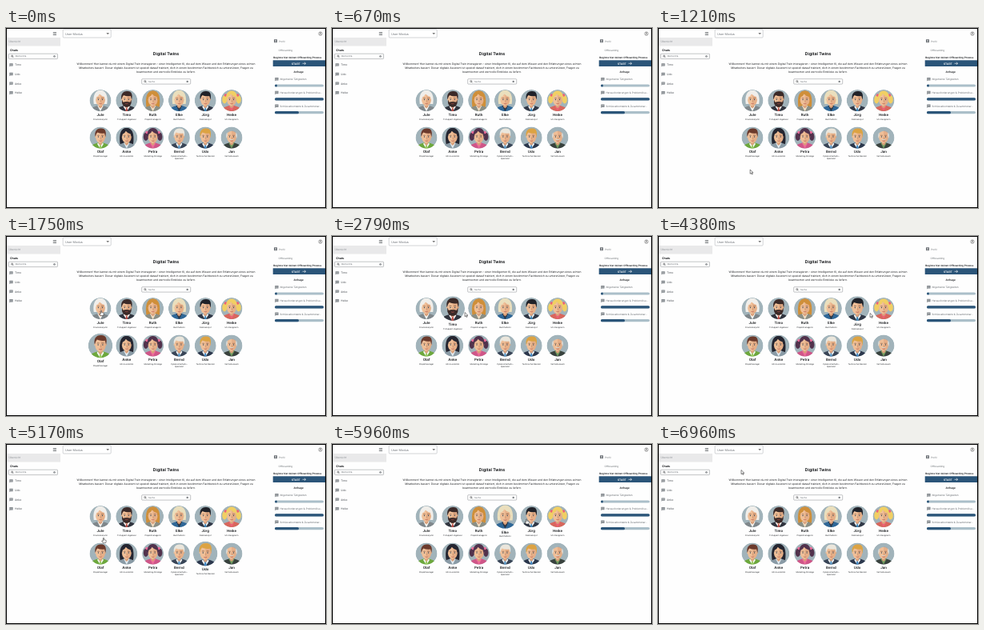
An HTML page for the animation above (7 s loop, 400 by 225 pixels).

```html
<!DOCTYPE html>
<html lang="de">
<head>
<meta charset="utf-8">
<title>Digital Twins</title>
<style>
  html, body { margin: 0; width: 100%; height: 100%; overflow: hidden; background: #fff; }
  svg { display: block; width: 100vw; height: 100vh; }
  text { font-family: Inter, Roboto, sans-serif; text-rendering: geometricPrecision; }
</style>
</head>
<body>
<svg id="stage" viewBox="0 0 400 225" preserveAspectRatio="none">
  <defs><clipPath id="disc"><circle r="13.5"/></clipPath></defs>
</svg>
<script>
const LOOP = 7000;
const NAVY = '#2b5579', INK = '#17191c', GREY = '#62676c';
const stage = document.getElementById('stage');

function add(parent, tag, attrs, content) {
  const node = document.createElementNS('http://www.w3.org/2000/svg', tag);
  for (const key in attrs) node.setAttribute(key, attrs[key]);
  if (content) node.textContent = content;
  parent.appendChild(node);
  return node;
}
const rect = (x, y, width, height, fill, more) =>
  add(stage, 'rect', { x, y, width, height, fill, ...more });
const line = (d, stroke, width = 0.5) =>
  add(stage, 'path', { d, stroke, 'stroke-width': width, fill: 'none' });
const label = (x, y, size, content, fill = GREY, weight = 400, anchor = 'start', parent = stage) =>
  add(parent, 'text', { x, y, 'font-size': size, fill, 'font-weight': weight, 'text-anchor': anchor }, content);

function searchBox(x, y, w, hint) {
  rect(x, y, w, 6.4, '#fff', { rx: 0.8, stroke: '#777c80', 'stroke-width': 0.45 });
  add(stage, 'circle', { cx: x + 4.1, cy: y + 2.9, r: 1, fill: 'none', stroke: INK, 'stroke-width': 0.5 });
  line(`M${x + 4.8} ${y + 3.6}l1.1 1.1`, INK);
  label(x + 8.3, y + 4.2, 2.7, hint);
  add(stage, 'circle', { cx: x + w - 4, cy: y + 3.2, r: 1.2, fill: '#6b7074' });
  line(`M${x + w - 4.5} ${y + 2.7}l1 1m0 -1l-1 1`, '#fff', 0.3);
}
function bubble(x, y) {
  add(stage, 'path', { d: `M${x} ${y}h4.2v3.4h-3.2l-1 1z`, fill: '#777d82' });
  line(`M${x + 0.8} ${y + 1.1}h2.6m-2.6 1.1h2.6`, '#fff', 0.35);
}

// Static page
function drawPage() {
  rect(0, 0, 400, 225, '#fefefe');
  rect(1, 12, 67, 10.5, '#e9e9ea');
  line('M58.8 5.5h4.2m-4.2 1.6h4.2m-4.2 1.6h4.2', '#3c4044', 0.6);
  label(3.5, 17.6, 3.2, 'Übersicht', '#8b9094');
  label(5, 28.6, 3.5, 'Chats', INK, 700);
  searchBox(3.5, 32.2, 61, 'Recherche');
  ['Timo', 'Udo', 'Anke', 'Heike'].forEach((name, i) => {
    const y = 46.2 + i * 11.6;
    bubble(4.4, y - 2);
    label(11, y + 1.2, 3.4, name, '#494e53');
  });

  rect(71.2, 1.8, 60, 10.2, '#fff', { rx: 1, stroke: '#a7abaf', 'stroke-width': 0.5 });
  label(74, 8.5, 3.8, 'User Modus', '#70757a');
  add(stage, 'path', { d: 'M125.4 6.2h3.6l-1.8 1.9z', fill: '#555' });

  label(200, 34, 5.2, 'Digital Twins', INK, 700, 'middle');
  [
    'Willkommen! Hier kannst du mit einem Digital Twin interagieren – einer Intelligenten KI, die auf dem Wissen und den Erfahrungen eines echten',
    'Mitarbeiters basiert. Dieser digitale Assistent ist speziell darauf trainiert, dich in einem bestimmten Fachbereich zu unterstützen, Fragen zu',
    'beantworten und wertvolle Einblicke zu liefern.'
  ].forEach((row, i) => label(200, 45.8 + i * 5.3, 3.33, row, '#1c1e21', 400, 'middle'));
  searchBox(169.7, 63.7, 61, 'Suche');

  add(stage, 'circle', { cx: 393, cy: 7, r: 2.2, fill: 'none', stroke: '#555', 'stroke-width': 0.5 });
  add(stage, 'circle', { cx: 393, cy: 6.3, r: 0.8, fill: '#555' });
  line('M391.6 8.5q1.4 -1.2 2.8 0', '#555');
  rect(335, 14.2, 4, 4, '#666b70', { rx: 0.4 });
  add(stage, 'circle', { cx: 337, cy: 15.7, r: 0.7, fill: '#fff' });
  line('M335.8 17.5q1.2 -1 2.4 0', '#fff');
  label(341, 17.5, 3, 'Profil', '#6d7276');
  label(340.6, 28.8, 3.1, 'Offboarding', '#6d7276');
  label(334.2, 38.2, 3.05, 'Beginne hier deinen Offboarding Prozess', INK, 600);
  rect(333.7, 40.3, 65.3, 7.7, NAVY);
  label(357, 45.5, 3.3, 'START', '#fff', 600);
  line('M370.6 44.3h4m-1.7 -1.6l1.7 1.6l-1.7 1.6', '#fff', 0.6);
  label(365.7, 55.7, 3.2, 'Anfrage', INK, 600, 'middle');
  [
    ['Allgemeine Tätigkeiten', 3],
    ['Herausforderungen & Problemlösu…', 61],
    ['Schlüsselkontakte & Zusammenar…', 30]
  ].forEach(([topic, done], i) => {
    const y = 64 + i * 16.8;
    bubble(336.3, y - 2);
    label(342.4, y + 1.1, 3.1, topic, '#666b70');
    rect(336, y + 6.4, 61, 3.2, '#abbfc9', { rx: 1.6 });
    rect(336, y + 6.4, done, 3.2, NAVY, { rx: 1.5 });
  });
}

// name, role lines, hair colour, clothing colour, accent colour, hair style
const people = [
  ['Jule', 'Finanzanalystin', '#f0eeea', '#7f878b', '#f5f4ef', 'bob'],
  ['Timo', 'IT-Support-Ingenieur', '#3b2a28', '#30343e', '#b94b45', 'beard'],
  ['Ruth', 'Projektmanagerin', '#cf8f3a', '#8b8f86', '#f1dfc5', 'long'],
  ['Elke', 'Buchhalterin', '#eadfbd', '#2f6797', '#2b3544', 'bob'],
  ['Jörg', 'Datenanalyst', '#202229', '#303847', '#3a83b6', 'short'],
  ['Heike', 'UX-Designerin', '#f1cf63', '#d8675c', '#ee5f76', 'tails'],
  ['Olaf', 'Projektmanager', '#6b3a2c', '#6da83d', '#9acc61', 'short'],
  ['Anke', 'HR-Assistentin', '#252631', '#8a9ba6', '#e2ebf0', 'long'],
  ['Petra', 'Marketing-Stratege', '#51324c', '#cf5688', '#ee6c9a', 'tails'],
  ['Bernd', 'Cybersicherheits-|Spezialist', '#eae6dc', '#394557', '#4d8fc0', 'short'],
  ['Udo', 'Technischer Berater', '#dca343', '#2c384d', '#3d86c3', 'short'],
  ['Jan', 'Vertriebscoach', '#d8d9d5', '#39423e', '#6e9b5e', 'bald']
];

function drawFace(disc, hair, cloth, accent, style) {
  add(disc, 'circle', { r: 13.5, fill: '#a1b3ba' });
  const g = add(disc, 'g', { transform: 'scale(1.1)' });
  const shape = (d, fill, opacity = 1) => add(g, 'path', { d, fill, opacity });
  const dot = (cx, cy, r, fill) => add(g, 'circle', { cx, cy, r, fill });
  const skin = '#efbf98';
  if (style === 'long') shape('M-7 10C-9 -1 -8 -11 0 -11S9 -1 7 10z', hair);
  if (style === 'bob') shape('M-7.5 4C-9 -5 -6 -11.5 0 -11.5S9 -5 7.5 4z', hair);
  if (style === 'tails') for (const side of [-1, 1]) {
    add(g, 'ellipse', { cx: 8 * side, cy: -1, rx: 2.7, ry: 4.6, fill: hair });
    dot(6.8 * side, -6, 1.6, accent);
  }
  shape('M-11.5 14C-11 8 -7 7.2 -3 6H3C7 7.2 11 8 11.5 14z', cloth);
  shape('M-3.4 5.8L0 12.6L3.4 5.8z', accent);
  shape('M-2 3h4v4l-2 2l-2 -2z', '#d99f7a');
  if (style === 'beard' || style === 'short') {
    shape('M-2.7 6L0 9.8L2.7 6L3.6 7.2L0 12.8L-3.6 7.2z', '#f4f4f2');
    shape('M-.8 9h1.6l.6 4h-2.8z', accent);
  }
  dot(-5.3, -1, 1, skin);
  dot(5.3, -1, 1, '#dba67f');
  shape('M-5.2 -5Q0 -10 5.2 -5V1Q4.4 5.5 0 6.5Q-4.4 5.5 -5.2 1z', skin);
  shape('M0 -8Q4 -8 5.2 -5V1Q4.4 5.5 0 6.5z', '#c97f55', 0.24);
  if (style === 'beard') shape('M-5.3 -1L-4 2Q0 .6 4 2L5.3 -1V3Q4 7.4 0 7.7Q-4 7.4 -5.3 3z', hair);
  if (style === 'bald') {
    shape('M-5.1 -6Q-7.4 -3 -5.6 1L-4.6 -3z', hair);
    shape('M5.1 -6Q7.4 -3 5.6 1L4.6 -3z', hair);
    shape('M-2.8 2.7Q0 .8 2.8 2.7z', hair);
  } else if (style === 'short' || style === 'beard') {
    shape('M-5.7 -1C-7.2 -7 -4 -11 1 -10.5C6 -10.5 7 -6 5.7 -1L4.6 -5Q0 -4.3 -3.4 -6L-4.7 -4z', hair);
  } else {
    shape('M-6 2C-7.5 -6 -5 -11 0 -11S7.5 -6 6 2L4.5 -4Q1 -5 -1 -7.5Q-2 -4.5 -4.6 -3.8z', hair);
  }
  for (const side of [-1, 1]) {
    dot(2.3 * side, -0.9, 0.6, '#34495a');
    add(g, 'path', { d: `M${2.3 * side - 1.2} -2.5h2.4`, stroke: '#674534', 'stroke-width': 0.5 });
  }
  add(g, 'path', { d: 'M0 -.8l.6 2.3h-1', fill: 'none', stroke: '#b57d5a', 'stroke-width': 0.4 });
  add(g, 'path', { d: 'M-1.5 3.5Q0 4.4 1.5 3.5', fill: 'none', stroke: '#b4534c', 'stroke-width': 0.6 });
}

function makeCard([name, role, ...look], i) {
  const x = 118 + (i % 6) * 32.8, y = i < 6 ? 90.5 : 137;
  const root = add(stage, 'g', { transform: `translate(${x} ${y})` });
  const face = add(root, 'g', { 'clip-path': 'url(#disc)' });
  drawFace(face, ...look);
  const words = add(root, 'g', {});
  label(0, 19.1, 4.4, name, INK, 600, 'middle', words);
  role.split('|').forEach((row, k) => label(0, 24 + k * 3.2, 2.45, row, '#25282b', 400, 'middle', words));
  return { x, y, face, words };
}

// Pointer track: time, x, y
const track = [
  [720, 110, 227], [880, 112, 203], [1300, 116, 172], [1500, 117, 154], [1680, 118, 130],
  [1750, 119, 95], [2250, 124, 98], [2550, 151, 98], [2790, 166, 97], [3200, 180, 98],
  [3650, 197, 97], [3710, 202, 97], [3960, 217, 97], [4250, 250, 97], [4520, 281, 99],
  [4740, 281, 140], [4960, 251, 140], [5110, 245, 136], [5170, 122, 119], [5300, 120, 138],
  [5600, 184, 138], [5720, 216, 135], [5840, 216, 95], [6080, 270, 96], [6220, 281, 97],
  [6340, 249, 96], [6600, 118, 84], [6740, 112, 60], [6830, 108, 40], [6960, 104, 34], [7000, 104, 34]
];
function pointerAt(t) {
  const next = track.findIndex(step => step[0] > t);
  if (next < 1) return null;
  const [t0, x0, y0] = track[next - 1], [t1, x1, y1] = track[next];
  const p = (t - t0) / (t1 - t0);
  return { x: x0 + (x1 - x0) * p, y: y0 + (y1 - y0) * p };
}
const over = (card, p) => p && Math.abs(p.x - card.x) < 15 && p.y > card.y - 14 && p.y < card.y + 27;

// Hover eases in and out behind the pointer
function hoverLevel(card, t) {
  let hits = 0;
  for (let k = 0; k < 8; k++) if (over(card, pointerAt(t - 60 - k * 20))) hits++;
  return hits / 8;
}

drawPage();
const cards = people.map(makeCard);
rect(0.5, 0.5, 399, 224, 'none', { stroke: '#000', 'stroke-width': 1 });
const pointerStyle = { fill: '#fff', stroke: '#222', 'stroke-width': 0.55, 'stroke-linejoin': 'round' };
const arrow = add(stage, 'path', { d: 'M0 0V5.2L1.3 4.1L2.2 6L3.1 5.5L2.2 3.8H3.9z', ...pointerStyle });
const hand = add(stage, 'path', {
  d: 'M-.6 0Q0 -.8 .6 0V2.1L2.8 2.6Q3.5 2.8 3.2 4L2.7 6H-.6L-2.4 3.6Q-1.9 2.8 -.6 3.7z', ...pointerStyle
});

function draw(t) {
  for (const card of cards) {
    const level = hoverLevel(card, t);
    card.face.setAttribute('transform', `scale(${1 + level * 0.13})`);
    card.words.setAttribute('transform', `translate(0 ${level * 2.2})`);
  }
  const p = pointerAt(t);
  const onCard = p && cards.some(card => over(card, p) || over(card, { x: p.x, y: p.y - 4 }));
  arrow.setAttribute('visibility', p && !onCard ? 'visible' : 'hidden');
  hand.setAttribute('visibility', onCard ? 'visible' : 'hidden');
  if (p) for (const shape of [arrow, hand]) shape.setAttribute('transform', `translate(${p.x} ${p.y - 1.5})`);
}
function tick() {
  draw(performance.now() % LOOP);
  requestAnimationFrame(tick);
}
tick();
</script>
</body>
</html>
```
